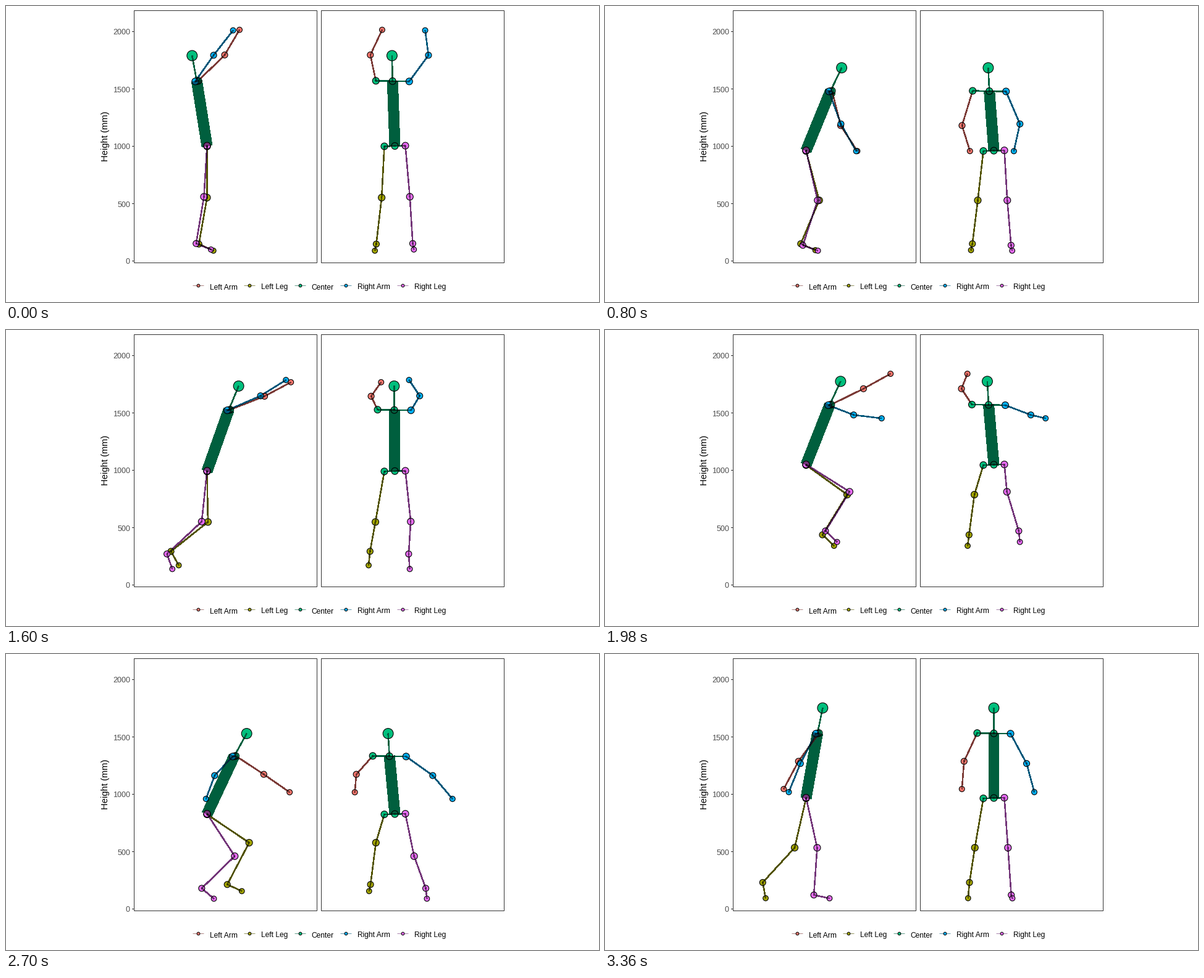
Animation of 960 by 480 pixels, one loop 3.38 s. Source, as a matplotlib script:

```python
import numpy as np
import matplotlib.pyplot as plt
from matplotlib.animation import FuncAnimation
from matplotlib.collections import LineCollection
from matplotlib.colors import to_rgb
from matplotlib.patches import Circle, Rectangle

W, H, DPI = 960, 480, 100
STEP, FRAMES = 20, 169
PX = 72 / DPI
T = np.arange(FRAMES) * STEP

COLORS = {"Left Arm": "#F8766D", "Left Leg": "#A3A500", "Center": "#00BF7D",
          "Right Arm": "#00B0F6", "Right Leg": "#E76BF3"}

# --- motion -----------------------------------------------------------------

# Reach up, lean back, crouch, take off, land, rise, step.
POSES = (0, 480, 1120, 1600, 2340, 3020, 3360)
TAKEOFF, LANDING, RISE = 1580, 2120, 66
SIDE_X, BACK_X, GROUND = 325, 629, 396.3


def track(*values, **extra):
    """Angles at the poses (plus extra t<ms> keys), eased with a monotone cubic."""
    keys = dict(zip(POSES, values))
    keys.update((int(name[1:]), v) for name, v in extra.items())
    t = np.array(sorted(keys), float)
    v = np.array([keys[k] for k in t], float)
    h = np.diff(t)
    s = np.diff(v) / h
    same = s[:-1] * s[1:] > 0
    m = np.concatenate([s[:1], np.where(same, 2 * s[:-1] * s[1:]
                                        / np.where(same, s[:-1] + s[1:], 1), 0), s[-1:]])
    i = np.clip(np.searchsorted(t, T, "right") - 1, 0, len(t) - 2)
    u = (T - t[i]) / h[i]
    return ((1 + 2 * u) * (1 - u) ** 2 * v[i] + u * (1 - u) ** 2 * h[i] * m[i]
            + u * u * (3 - 2 * u) * v[i + 1] + u * u * (u - 1) * h[i] * m[i + 1])


def bone(length, swing, spread):
    """Offset (forward, right, down); swing 0 hangs down and 90 points forward."""
    a, b = np.radians(swing), np.radians(spread)
    return np.stack(np.broadcast_arrays(length * np.cos(b) * np.sin(a),
                                        length * np.sin(b),
                                        length * np.cos(b) * np.cos(a)), axis=1)


# Both sides share the arm lift in the air and the crouch, push, tuck and reach.
lift_upper, lift_fore = dict(t1740=128), dict(t1740=132)
jump_thigh = dict(t1260=42, t1480=24, t1820=38, t2120=66)
jump_shank = dict(t1260=-31, t1480=-38, t1820=-75, t2120=4)
jump_foot = dict(t1260=72, t1480=58, t1820=8, t2120=78)

# (length, swing, spread) from shoulder to wrist and from hip to toe.
arms = {
    "l": [(60.5, track(134.5, 141, -113, 111.5, 82, 28.5, -36, **lift_upper),
           track(-8.5, -10.5, -21.5, -10, -23.5, -27, -20.5)),
          (51, track(149.5, 159, -93, 118, 81.5, 27.5, -28, **lift_fore),
           track(22, 20.5, 9.5, 18.5, 1.5, -4.5, -4))],
    "r": [(60.5, track(145, 149, -108.5, 113.5, -41, -44, -27.5, **lift_upper),
           track(31, 29.5, 14.5, 13.5, 70.5, 24.5, 25.5)),
          (51.5, track(142, 150.5, -92, 122, -12, -23, -22, **lift_fore),
           track(-6, -11.5, -10.5, -19.5, 71, 11, 14))]}
legs = {
    "l": [(83.3, track(0, -2, 38, 1, 83, 18, -13, **jump_thigh),
           track(-3, -5, -7.5, -10, -10, -9, -9.5)),
          (77, track(-10, -17, -29, -51.5, -29.5, -26, -42.5, **jump_shank), -6.5),
          (26, track(65.5, 64, 70.5, 29, 68, 63, 10.5, **jump_foot), -5)],
    "r": [(83.3, track(-3.5, -5.5, 38, -6, 64, 9.5, 12.5, **jump_thigh),
           track(5, 2, 5, 6, 0, 18, 4)),
          (77, track(-9.5, -12.5, -26.5, -47, -50.5, -36, -4, **jump_shank),
           track(3.5, 5, 3.5, -2.5, 30, 1, 4)),
          (26, track(68, 67.5, 73, 19.5, 66, 42, 78, **jump_foot), 4)]}

lean = track(-9, -11, 55.5, 19.5, 24, 25.5, 10)
tilt = track(-2, -4.5, -3, -.5, -8.5, -1, 0)
spine = bone(107 - 17 * np.sin(np.radians(lean)) ** 2, 180 - lean, tilt)
skull = bone(42, 180 - 1.15 * lean, .6 * tilt)

J = {"pelvis": np.zeros((FRAMES, 3)), "neck": spine, "head": spine + skull}
for side, sign in (("l", -1), ("r", 1)):
    for root, start, parts, names in (
            (J["neck"], (-2.5, 27, .5), arms, "shoulder elbow wrist"),
            (J["pelvis"], (0, 17, -.5), legs, "hip knee ankle toe")):
        point = root + sign * np.array(start)
        first, *rest = names.split()
        J[f"{first}_{side}"] = point
        for name, part in zip(rest, parts[side]):
            point = point + bone(*part)
            J[f"{name}_{side}"] = point

# The lowest foot carries the body, except along the parabola of the jump.
depth = np.max([J["toe_l"][:, 2], J["toe_r"][:, 2],
                J["ankle_l"][:, 2] + 6, J["ankle_r"][:, 2] + 6], axis=0)
height = GROUND - depth
u = (T - TAKEOFF) / (LANDING - TAKEOFF)
y0, y1 = height[TAKEOFF // STEP], height[LANDING // STEP]
height = np.where((u > 0) & (u < 1), y0 + (y1 - y0) * u - 4 * RISE * u * (1 - u), height)
origin = np.stack([np.full(FRAMES, SIDE_X), np.full(FRAMES, BACK_X), height], axis=1)
J = {name: p + origin for name, p in J.items()}

# --- figure -----------------------------------------------------------------

CHAINS = [("Center", "pelvis neck"), ("Center", "neck head"),
          ("Center", "shoulder_l neck shoulder_r"), ("Center", "hip_l pelvis hip_r"),
          ("Left Arm", "shoulder_l elbow_l wrist_l"),
          ("Left Leg", "hip_l knee_l ankle_l toe_l"),
          ("Right Arm", "shoulder_r elbow_r wrist_r"),
          ("Right Leg", "hip_r knee_r ankle_r toe_r")]
BONES = [(group, a, b) for group, names in CHAINS
         for a, b in zip(names.split(), names.split()[1:])]
DOTS = [("Center", "head hip_l pelvis shoulder_l neck"), ("Left Arm", "elbow_l wrist_l"),
        ("Left Leg", "knee_l ankle_l toe_l"), ("Right Arm", "shoulder_r elbow_r wrist_r"),
        ("Right Leg", "hip_r knee_r ankle_r toe_r")]
RADIUS = {"head": 8.4, "elbow": 5, "wrist": 4.4, "ankle": 5, "toe": 4.3}

fig = plt.figure(figsize=(W / DPI, H / DPI), dpi=DPI, facecolor="white")
ax = fig.add_axes([0, 0, 1, 1])
ax.set_xlim(-.5, W - .5)
ax.set_ylim(H - .5, -.5)
ax.axis("off")


def label(x, y, text, size, color="black", **kw):
    ax.text(x, y, text, fontsize=size * PX, color=color, family="Liberation Sans", **kw)


def dash(x0, x1, y, color, **kw):
    ax.plot([x0, x1], [y, y], color=color, lw=PX, solid_capstyle="butt", snap=False, **kw)


for left in (207, 510):
    ax.add_patch(Rectangle((left, 7), 296, 409, fill=False, ec="#333333", lw=PX, snap=False))
for n in range(5):
    y = 413 - 93 * n
    dash(203.5, 206.5, y, "#333333")
    label(200.5, y + 5, str(500 * n), 12.5, "#4D4D4D", ha="right", va="baseline")
label(161, 211, "Height (mm)", 14.8, rotation=90, ha="center", va="center")

for (name, color), x, text_x in zip(COLORS.items(), (311, 394, 476, 550, 642),
                                    (330, 413, 494, 569, 661)):
    dash(x - 9, x + 9, 453, [c / 2 for c in to_rgb(color)], alpha=.6)
    ax.add_patch(Circle((x, 453), 2.4, fc=color, ec="black", lw=PX, zorder=3))
    label(text_x - .5, 459, name, 12, va="baseline")

widths = [(17 if (a, b) == ("pelvis", "neck") else 1.5) * PX for _, a, b in BONES]


def bones(colors, zorder):
    lines = LineCollection([], colors=colors, linewidths=widths, zorder=zorder,
                           antialiaseds=False, capstyle="butt", snap=False)
    return ax.add_collection(lines, autolim=False)


# Each view: its horizontal axis, tinted bones, dots, and a half-black layer on top.
views = []
for axis in (0, 1):
    tinted = bones([COLORS[g] for g, _, _ in BONES], 2)
    dots = []
    for group, names in DOTS:
        for name in names.split():
            dot = Circle((0, 0), RADIUS.get(name.split("_")[0], 5.5), fc=COLORS[group],
                         ec="black", lw=1.1 * PX, zorder=3)
            dots.append((name, ax.add_patch(dot)))
    views.append((axis, tinted, dots, bones([(0, 0, 0, .5)] * len(BONES), 4)))


def draw(i):
    for axis, tinted, dots, shade in views:
        place = {name: (p[i, axis], p[i, 2]) for name, p in J.items()}
        lines = [(place[a], place[b]) for _, a, b in BONES]
        tinted.set_segments(lines)
        shade.set_segments(lines)
        for name, dot in dots:
            dot.set_center(place[name])
    return []


anim = FuncAnimation(fig, draw, frames=FRAMES, interval=STEP, repeat=True,
                     repeat_delay=0, blit=False)
plt.show()
```
